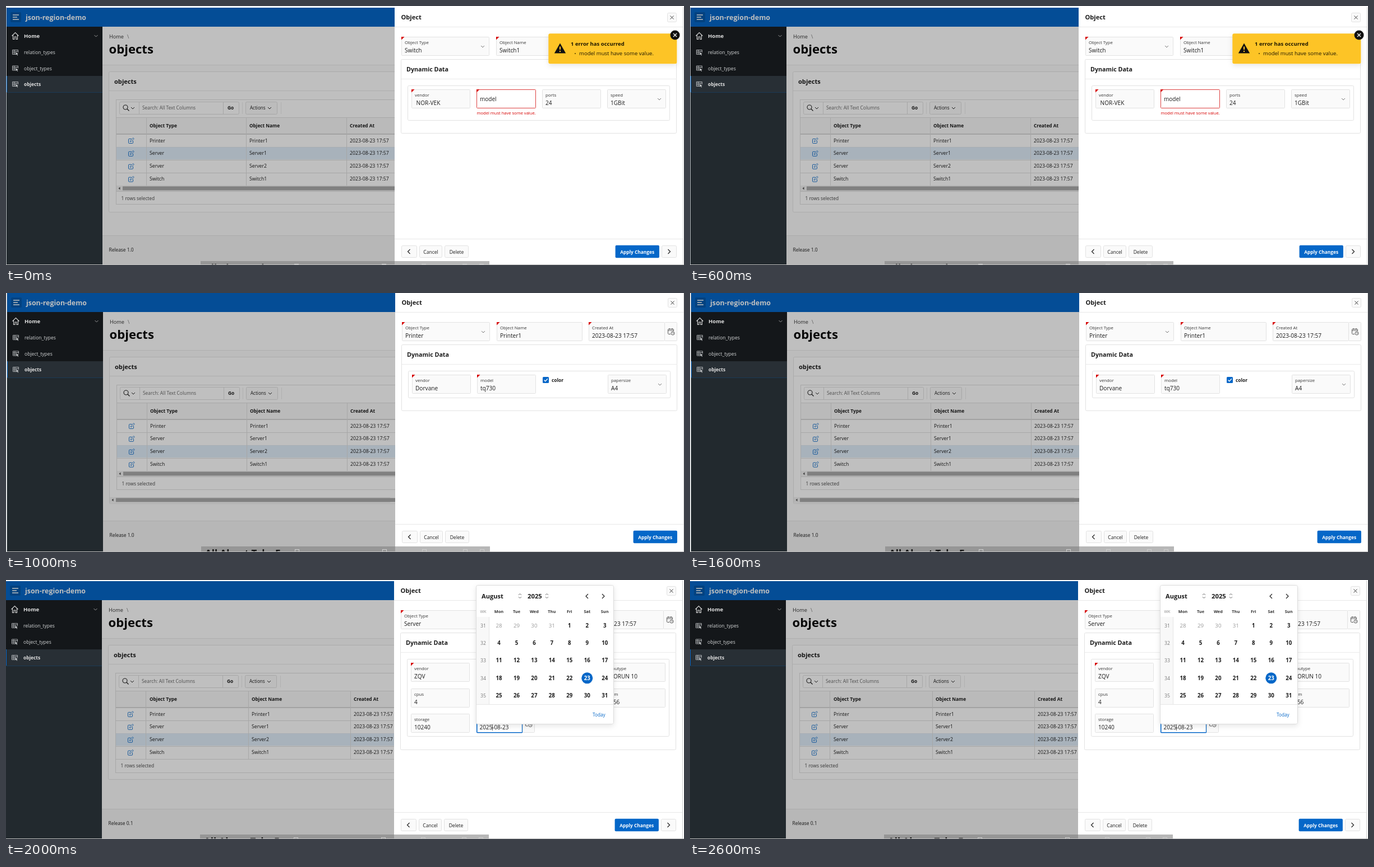
Write an HTML page that moves like this. It is 1209x463 px and loops after 3000 ms.

```html
<!DOCTYPE html>
<html lang="en">
<head>
<meta charset="utf-8">
<title>json-region-demo</title>
<style>
html, body { margin: 0; width: 100%; height: 100%; overflow: hidden; background: #fff; }
svg { display: block; width: 100vw; height: 100vh; font-family: "Open Sans", "Noto Sans", sans-serif; }
text { white-space: pre; }
</style>
</head>
<body>
<svg id="stage" viewBox="0 0 1209 463">
  <defs>
    <filter id="shadow" x="-20%" y="-20%" width="140%" height="150%">
      <feDropShadow dx="0" dy="3" stdDeviation="5" flood-color="#000" flood-opacity=".1"/>
    </filter>
  </defs>
  <g id="view"></g>
</svg>
<script>
const BLUE = '#0567c8', INK = '#1c1c1c', RED = '#d60000', EDGE = '#e2e2e2', LINE = '#dedede';
const PERIOD = 3000;

// Drawing helpers, all returning SVG markup
const rect = (x, y, w, h, fill, stroke, r = 0, sw = 1) =>
  `<rect x="${x}" y="${y}" width="${w}" height="${h}" rx="${r}" fill="${fill}"` +
  (stroke ? ` stroke="${stroke}" stroke-width="${sw}"` : '') + '/>';
const text = (x, y, size, str, fill = INK, bold = false, anchor = 'start') =>
  `<text x="${x}" y="${y}" font-size="${size}" fill="${fill}" text-anchor="${anchor}"` +
  `${bold ? ' font-weight="700"' : ''}>${str}</text>`;
const path = (d, stroke, sw = 1, fill = 'none') =>
  `<path d="${d}" stroke="${stroke}" stroke-width="${sw}" fill="${fill}"/>`;
const hline = (x, y, w, c) => rect(x, y, w, 1, c);
const vline = (x, y, h, c) => rect(x, y, 1, h, c);
const circle = (x, y, r, fill) => `<circle cx="${x}" cy="${y}" r="${r}" fill="${fill}"/>`;
const move = (x, y, body) => `<g transform="translate(${x} ${y})">${body}</g>`;

const down = (x, y, c = '#555', s = 3) => path(`M${x - s} ${y - s / 2}l${s} ${s}l${s} ${-s}`, c);
const side = (x, y, dir, s = 4) => path(`M${x - dir * s / 2} ${y - s}l${dir * s} ${s}l${-dir * s} ${s}`, '#222', 1.2);
const cross = (x, y, s, c, sw = 1) => path(`M${x - s} ${y - s}l${2 * s} ${2 * s}M${x + s} ${y - s}l${-2 * s} ${2 * s}`, c, sw);
const sorter = (x, y) => path(`M${x - 2.5} ${y - 1.5}l2.5 -2.5l2.5 2.5M${x - 2.5} ${y + 1.5}l2.5 2.5l2.5 -2.5`, '#555', .9);

const listIcon = y => move(11, y - 5,
  path('M7 8.5H.5V.5H10.5V5M.5 3H10.5M.5 5.7H6M3.8 .5V8.5M7 3V5', '#c8cbcd', .8) +
  path('M6 5l5 2l-2 .8l1.2 2.2l-1 .5l-1.2 -2.2l-1.2 1.3z', 'none', 0, '#c8cbcd'));
const editIcon = y => move(218, y - 5,
  path('M5.5 2H1.5Q.5 2 .5 3V9Q.5 10 1.5 10H7.5Q8.5 10 8.5 9V5.5', BLUE, .9) +
  path('M3.4 7.2l.5 -2.2l4.8 -4.8l1.6 1.6l-4.8 4.8z', BLUE, .8));
const calendarIcon = (x, y) => move(x - 6, y - 6,
  path('M5 10.5H1.5Q.5 10.5 .5 9.5V2.5Q.5 1.5 1.5 1.5H9.5Q10.5 1.5 10.5 2.5V5M.5 4H10.5M3 0V2.5M8 0V2.5', '#444', .9) +
  '<circle cx="9" cy="9" r="3" fill="#fff" stroke="#444" stroke-width=".9"/>' + path('M9 7.3V9.2H10.5', '#444', .8));

function sidebar() {
  let s = rect(0, 37, 172, 440, '#22292e') + rect(0, 37, 172, 88, '#14171a') +
    rect(0, 125, 172, 29, '#282f35') + hline(0, 154, 172, '#1b3a55') + rect(0, 125, 2, 29, BLUE);
  s += path('M10.5 53.5l6 -6l6 6M12.5 52V59.5H15V55H18V59.5H20.5V52', '#d8d8d8', 1.1);
  s += text(32, 56.5, 9.5, 'Home', '#e2e2e2', true) + down(160.5, 53.5, '#999');
  ['relation_types', 'object_types', 'objects'].forEach((name, i) => {
    const y = 83 + i * 28.5;
    s += listIcon(y) + text(32, y + 3, i < 2 ? 8.55 : 8.4, name, i < 2 ? '#d2d4d5' : '#e2e2e2', i === 2);
  });
  return s;
}

function grid(p) {
  const cols = p.cols, bottom = p.bar ? 354 : 345;
  let s = rect(196.5, 167.5, 520, bottom - 167, '#fff', LINE);
  s += rect(202.5, 171.5, 213, 22, '#fff', LINE, 2) + vline(237, 172, 21, LINE) + vline(387, 172, 21, LINE);
  s += '<circle cx="213" cy="181" r="4" fill="none" stroke="#222" stroke-width="1.1"/>' +
    path('M216 184l3.5 3.5', '#222', 1.2) + down(226, 182.5, '#222');
  s += text(243, 185, 8.4, 'Search: All Text Columns', '#666') + text(395, 185, 8.3, 'Go', INK, true);
  s += vline(421, 172, 21, '#ebebeb') + rect(427.5, 171.5, 56, 22, '#fafafa', LINE, 2) +
    text(435, 185, 8.1, 'Actions') + down(470, 182.5, '#222') + vline(490, 172, 21, '#ebebeb');
  s += rect(197, 200, 500, 28, '#f8f8f8') + hline(197, 199, 500, LINE) + rect(197, 228, 500, 2, '#d8d8d8');
  ['Object Type', 'Object Name', 'Created At'].forEach((h, i) =>
    s += text(cols[i] + 6, 217, 8.3, h, INK, true));
  [['Printer', 'Printer1'], ['Server', 'Server1'], ['Server', 'Server2'], ['Switch', 'Switch1']].forEach((r, i) => {
    const y = 240.5 + i * 22.9;
    if (i === p.row) s += rect(197, y - 11, 500, 22, '#e0edf9');
    s += hline(197, Math.round(y + 11.3), 500, LINE) + editIcon(y);
    [...r, '2023-08-23 17:57'].forEach((v, k) => s += text(cols[k] + 6, y + 3, 8.7, v));
  });
  for (const x of [250, cols[1], cols[2]]) s += vline(x, 200, 121, LINE);
  if (p.bar) s += scrollbar(197, 321) + hline(197, 331, 500, LINE);
  return s + text(205.5, p.bar ? 347 : 336, 8.3, '1 rows selected', '#444');
}

const scrollbar = (x, y) => rect(x, y, 500, 10, '#f0f0f0') + rect(x + 11, y + 1.5, 520, 7, '#aaa') +
  path(`M${x + 6.5} ${y + 2.5}l-3 2.5l3 2.5z`, 'none', 0, '#555');

function page(p) {
  let s = rect(0, 3, 1208, 34, BLUE) + rect(172, 37, 530, 440, '#fbfbfb') +
    rect(172, 37, 530, 68, '#fff') + hline(172, 105, 530, '#e8e8e8');
  s += rect(8, 11, 19, 18, '#0458ab', null, 2) + path('M12 16H23M12 20H20M12 24H23', '#fff', 1.3) +
    text(35, 24.5, 12.4, 'json-region-demo', '#fff', true);
  s += text(184, 58, 9.2, 'Home', '#333') + text(216, 58, 9.2, '\\', '#777') + text(183.5, 85, 22.1, 'objects', '#080808', true);
  s += rect(183.5, 117.5, 530, p.cardEnd - 117, '#fff', '#e4e4e4', 2) + hline(184, 151, 520, '#e8e8e8') +
    text(193, 139, 11.1, 'objects', INK, true) + grid(p);
  if (p.cardBar) s += scrollbar(184, 368);
  s += rect(172, 410, 530, 60, '#f4f4f4') + hline(172, 410, 530, '#e4e4e4') + text(183.5, 439, 8.4, p.release);
  s += rect(0, 3, 1208, 475, '#000" fill-opacity=".25');
  return s + sidebar() + vline(0, 2, 470, '#b8bcc0');
}

function field(x, y, w, label, value, { need, list, bad } = {}) {
  let s = rect(x + .5, y + .5, w - 1, 33, bad ? '#fff' : '#fafafa', bad ? '#dc4040' : EDGE, 1);
  if (need) s += path(`M${x} ${y}h5.5l-5.5 5.5z`, 'none', 0, RED);
  s += bad ? text(x + 6, y + 20.5, 10, label) : text(x + 6, y + 13, 7.8, label, '#333') + text(x + 6, y + 28, 10.1, value);
  return list ? s + down(x + w - 12, y + 17.5, '#777') : s;
}

const button = (x, w, label) =>
  rect(x + .5, 428.5, w - 1, 21, '#fafafa', EDGE, 2) + (label ? text(x + w / 2, 442.5, 8.5, label, INK, false, 'middle') : '');

function panel(p) {
  let s = rect(693, 2, 515, 480, '#fff') + vline(1207, 2, 480, '#cfcfcf');
  s += text(704.5, 24, 11.1, 'Object', INK, true) + hline(693, 37, 514, '#e8e8e8');
  s += rect(1179.5, 12.5, 16, 16, '#fafafa', EDGE, 2) + cross(1187.5, 20.5, 3, '#333');
  s += field(705, 55, 157, 'Object Type', p.type, { need: true, list: true }) +
    field(874, 55, 153, 'Object Name', p.name, { need: true }) +
    field(1038, 55, 136, 'Created At', '2023-08-23 17:57', { need: true }) +
    rect(1173.5, 55.5, 22, 33, '#fafafa', EDGE, 1) + calendarIcon(1185, 72);
  s += rect(704.5, 95.5, 491, p.regionEnd - 95, '#fff', EDGE, 2) + hline(705, 130, 491, '#ebebeb') +
    text(714, 117, 10.7, 'Dynamic Data', INK, true);
  s += rect(716.5, 142.5, 467, p.innerEnd - 142, '#fff', EDGE, 2) + p.fields();
  s += hline(693, 416, 514, '#e8e8e8') + button(705, 28) + side(718.5, 439, -1) +
    button(737, 41, 'Cancel') + button(782, 43, 'Delete');
  s += rect(p.applyX - .4, 427.7, 78.3, 22.6, BLUE, null, 2) + text(p.applyX + 38.7, 442.5, 8.35, 'Apply Changes', '#fff', true, 'middle');
  if (p.next) s += button(1169, 27) + side(1182.5, 439, 1);
  return s;
}

function alertBox() {
  return `<g filter="url(#shadow)">${rect(967.3, 49.3, 229, 54, '#fdc426', null, 3)}</g>` +
    path('M988 68.5L996.5 83.5H979.5Z', '#111', 2, '#111') + rect(987, 72.5, 2, 5.5, '#fdc426') + circle(988, 81, 1.2, '#fdc426') +
    text(1007, 71, 9.5, '1 error has occurred', '#1d1700', true) +
    circle(1015, 85, 1.1, '#5c4600') + text(1022, 88, 9.55, 'model must have some value.', '#1d1700') +
    circle(1193, 52, 8.5, '#111') + cross(1193, 52, 3, '#fff', 1.2);
}

function datePicker() {
  const col = i => 880 + i * 31.45, row = i => 82 + i * 31.45;
  let s = `<g filter="url(#shadow)">${rect(839.5, 10.5, 245, 248, '#fff', '#dcdcdc', 3)}</g>`;
  s += text(849, 33.5, 11.1, 'August', INK, true) + sorter(917.5, 29.5) +
    text(931, 33.5, 11.3, '2025', INK, true) + sorter(965.5, 29.5) + side(1037, 30, -1) + side(1066, 30, 1);
  s += rect(840, 67, 22, 156, '#f8f8f8') + vline(862, 67, 156, '#e6e6e6') + hline(840, 223, 244, '#e6e6e6');
  s += text(852, 60, 7.2, 'WK', '#888', false, 'middle');
  ['Mon', 'Tue', 'Wed', 'Thu', 'Fri', 'Sat', 'Sun'].forEach((d, i) => s += text(col(i), 60, 7.4, d, '#333', true, 'middle'));
  for (let i = 0; i < 35; i++) {
    const day = i < 4 ? 28 + i : i - 3, x = col(i % 7), r = Math.floor(i / 7), y = row(r);
    const picked = i > 3 && day === 23;
    if (i % 7 === 0) s += text(852, y + 3.5, 8.6, 31 + r, '#777', false, 'middle');
    if (picked) s += circle(x, y, 10, BLUE);
    s += text(x, y + 3.5, 9.7, day, picked ? '#fff' : i < 4 ? '#999' : INK, i > 3, 'middle');
  }
  return s + text(1047, 244.5, 8.2, 'Today', BLUE);
}

// Top edge of a strip cut off by the bottom of the window
function strip() {
  let s = rect(347, 456, 515, 20, '#7d7d7d" fill-opacity=".55') + text(354, 475, 17, 'All About Tabs E', '#151515', true);
  for (const x of [518, 674, 745, 818, 848]) s += rect(x - 3.5, 461.5, 7, 8, 'none', '#cfcfcf');
  return s;
}

const scenes = [
  {
    dx: 0, dy: 0, row: 1, bar: true, cols: [250, 428, 607], cardEnd: 368, release: 'Release 1.0',
    type: 'Switch', name: 'Switch1', regionEnd: 227, innerEnd: 204, applyX: 1087, next: true,
    fields: () => field(723, 149, 105, 'vendor', ' NOR-VEK', { need: true }) +
      field(839, 149, 106, 'model', '', { need: true, bad: true }) +
      text(839.5, 194, 7.55, 'model must have some value.', RED) +
      field(956, 149, 105, 'ports', '24') + field(1072, 149, 105, 'speed', '1GBit', { list: true }),
    over: alertBox
  },
  {
    dx: 1, dy: -3, row: 2, bar: true, cols: [250, 428, 607], cardEnd: 379, cardBar: true, release: 'Release 1.0',
    type: 'Printer', name: 'Printer1', regionEnd: 213, innerEnd: 190, applyX: 1118, next: false,
    fields: () => field(723, 149, 105, 'vendor', 'Dorvane', { need: true }) +
      field(839, 149, 105, 'model', 'tq730', { need: true }) +
      rect(956, 153, 11, 11, BLUE, null, 1.5) + path('M958.5 158.5l2.3 2.3l4 -4.5', '#fff', 1.3) +
      text(972, 162, 8.4, 'color', INK, true) + field(1072, 149, 105, 'papersize', 'A4', { list: true })
  },
  {
    dx: -1, dy: -1, row: 2, bar: false, cols: [251, 433, 615], cardEnd: 357, release: 'Release 0.1',
    type: 'Server', name: 'Server1', regionEnd: 304, innerEnd: 280, applyX: 1087, next: true,
    fields: () => field(723, 149, 105, 'vendor', 'ZQV', { need: true }) +
      field(1072, 149, 105, 'cputype', 'VORUN 10') +
      field(723, 195, 105, 'cpus', '4') + field(1072, 195, 105, 'ram', '256') +
      field(723, 240, 105, 'storage', '10240') +
      rect(840.7, 240.7, 81, 33, '#fff', BLUE, 1, 1.6) + text(845.5, 268, 9.95, '2025-08-23') + rect(867.8, 258, .8, 12, '#111') +
      rect(922.5, 240.5, 21, 33, '#fafafa', EDGE, 1) + calendarIcon(933, 257.5),
    over: datePicker
  }
].map(p => move(p.dx, p.dy, page(p) + panel(p) + (p.over ? p.over() : '') + strip()) + hline(0, 462, 1209, '#bdbdbd'));

const view = document.getElementById('view');
let shown = -1;
function draw(t) {
  const i = Math.floor((t % PERIOD) / (PERIOD / scenes.length));
  if (i !== shown) view.innerHTML = scenes[shown = i];
}
let start;
function tick(now) {
  start ??= now;
  draw(now - start);
  requestAnimationFrame(tick);
}
draw(0);
requestAnimationFrame(tick);
</script>
</body>
</html>
```
